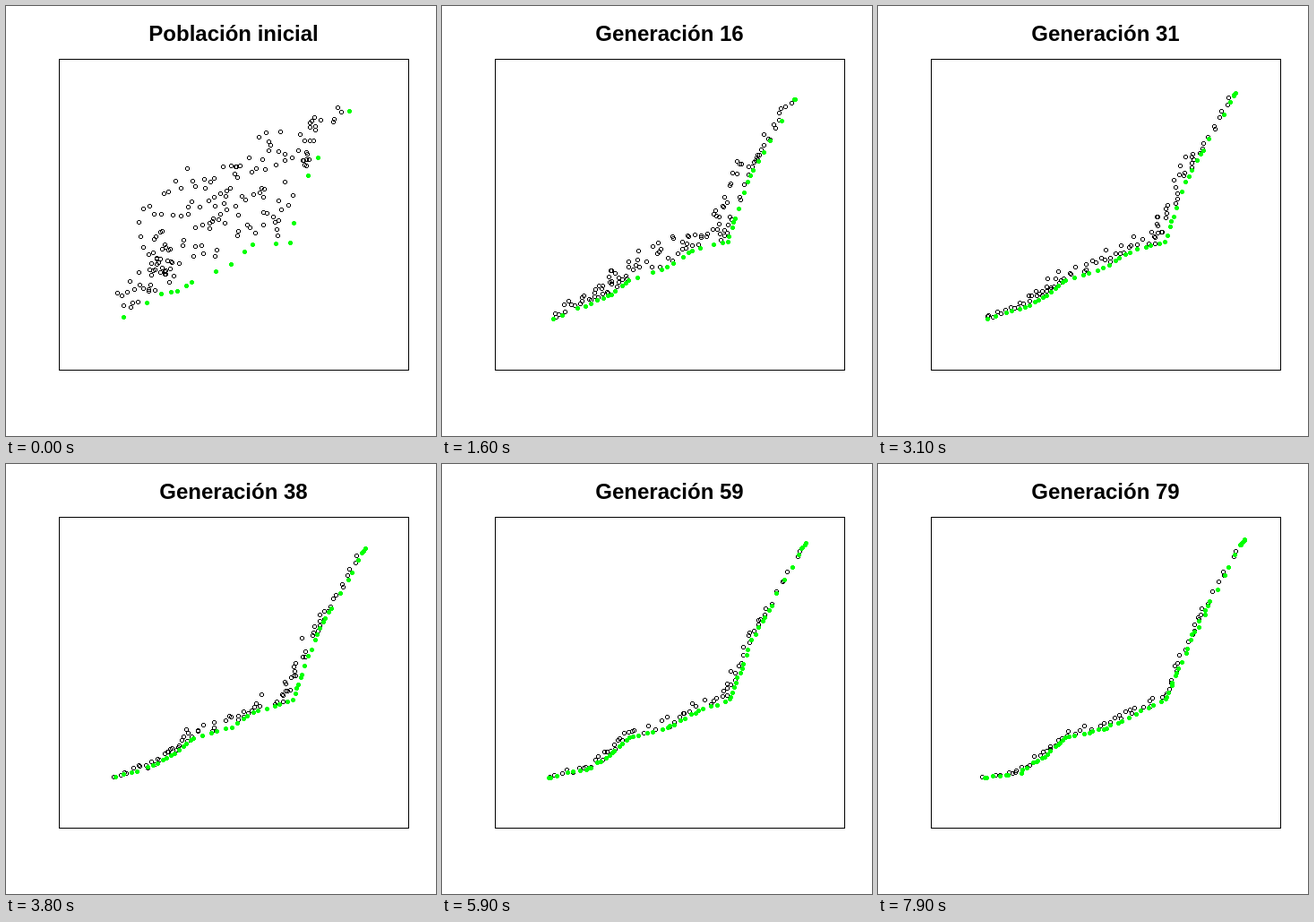
These frames come from a looping animation (480x480 px, 8 s). An HTML page with a canvas:

```html
<!DOCTYPE html>
<html lang="es">
<head>
<meta charset="utf-8">
<title>Frente de Pareto</title>
<style>
  html, body { margin: 0; width: 480px; height: 480px; overflow: hidden; background: #fff; }
  svg, canvas { position: absolute; left: 0; top: 0; }
  text { font: bold 24px "Liberation Sans", Arial, sans-serif; text-anchor: middle; }
  rect { fill: none; stroke: #000; }
</style>
</head>
<body>
<svg width="480" height="480">
  <text id="title" x="254" y="39">Población inicial</text>
  <rect x="59.5" y="59.5" width="390" height="347"/>
</svg>
<canvas id="plot" width="480" height="480"></canvas>
<script>
const STEP = 100, GENS = 80;
const title = document.getElementById('title');
const ctx = document.getElementById('plot').getContext('2d');

// Corners of the Pareto front in the first and the last generation
const FIRST = [[131, 347], [173, 321], [191, 318], [207, 308], [251, 288], [275, 266],
  [317, 264], [321, 242], [337, 189], [348, 169], [383, 117]];
const LAST = [[115, 351], [157, 347], [186, 327], [210, 304], [252, 297], [285, 281],
  [322, 262], [336, 230], [353, 190], [373, 155], [410, 83]];
const END = FIRST.length - 1;

const mix = (a, b, k) => a + (b - a) * k;
const rand = seed => {
  const v = Math.sin(seed * 12.9898 + 4.1) * 43758.5453;
  return v - Math.floor(v);
};

function along(curve, u) {
  const i = Math.min(END - 1, Math.floor(u));
  return [0, 1].map(d => mix(curve[i][d], curve[i + 1][d], u - i));
}

// The front moves outwards, fast at first
function frontAt(u, gen) {
  const a = along(FIRST, u), b = along(LAST, u);
  const k = Math.sqrt(gen / (GENS - 1));
  return [mix(a[0], b[0], k), mix(a[1], b[1], k)];
}

// Each solution is replaced at ever longer intervals
function lastBirth(seed, gen) {
  let born = 0;
  for (let b = 1 + 8 * rand(seed); b <= gen; b *= 1.8) born = b;
  return born;
}

function elite(i, gen) {
  const u = Math.min(END, i % (END + 1) + Math.floor(i / (END + 1)) * 0.618 % 1);
  return frontAt(u, lastBirth(i + 900, gen)).map(Math.round);
}

// The rest lie behind the front, closer with every generation
function follower(i, gen) {
  const u = i * 0.618034 % 1 * END;
  const born = lastBirth(i + 300, gen);
  const [x, y] = frontAt(u, born);
  const depth = (30 + 85 * Math.sin(Math.PI * u / END)) / (1 + born / 4);
  const dist = depth * mix(0.1, 1, rand(i * 31 + born));
  const angle = (mix(80, 10, u / END) + mix(-18, 18, rand(i * 17 + born + 500))) * Math.PI / 180;
  return [x - dist * Math.cos(angle), y - dist * Math.sin(angle)].map(Math.round);
}

// Five-pixel circle with hard edges
function dot([x, y], green) {
  ctx.fillStyle = green ? '#0f0' : '#000';
  for (const s of [-2, 2]) {
    ctx.fillRect(x - 1, y + s, 3, 1);
    ctx.fillRect(x + s, y - 1, 1, 3);
  }
  if (green) ctx.fillRect(x - 1, y - 1, 3, 3);
}

const make = (count, place, gen) => Array.from({ length: Math.round(count) }, (_, i) => place(i, gen));

function draw(gen) {
  title.textContent = gen ? 'Generación ' + gen : 'Población inicial';
  ctx.clearRect(0, 0, 480, 480);
  const best = make(17 + 6 * Math.sqrt(gen), elite, gen);
  const rest = make(60 + 114 * Math.exp(-gen / 25), follower, gen);
  const beaten = p => best.some(q => q[0] > p[0] && q[1] > p[1]);
  for (const p of [...rest, ...best.filter(beaten)]) dot(p, false);
  for (const p of best) if (!beaten(p)) dot(p, true);
}

let start, shown = -1;
function tick(now) {
  start ??= now;
  const gen = Math.floor((now - start) / STEP) % GENS;
  if (gen !== shown) draw(shown = gen);
  requestAnimationFrame(tick);
}
draw(0);
requestAnimationFrame(tick);
</script>
</body>
</html>
```
